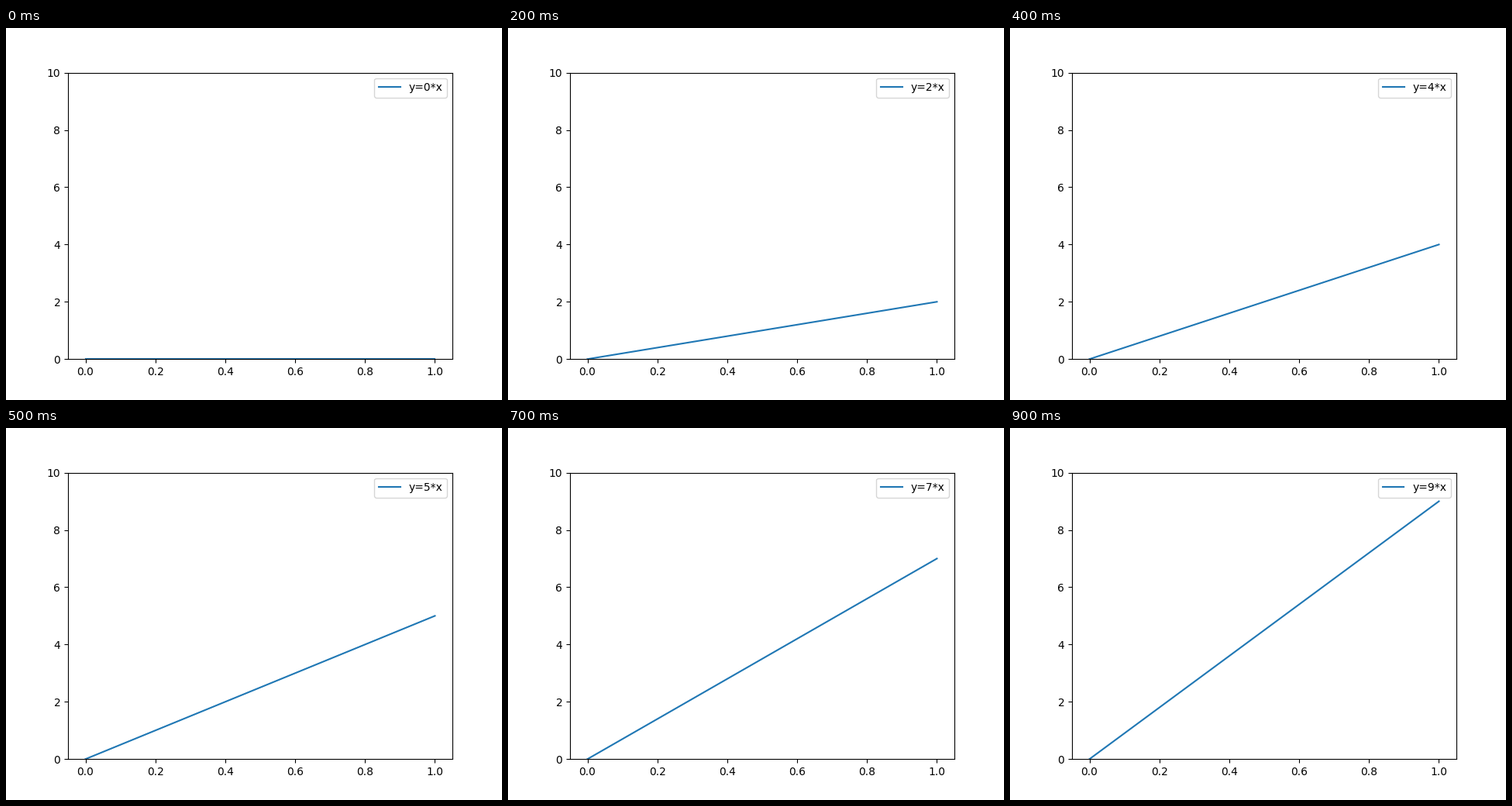
Recreate the animation shown at these times as a matplotlib script. Size 640 by 480 pixels, loop 1000 ms.

```python
import matplotlib.pyplot as plt
import numpy as np
from matplotlib.animation import FuncAnimation

FRAMES = 10
INTERVAL_MS = 100

fig, ax = plt.subplots(figsize=(6.4, 4.8), dpi=100)
x = np.array([0.0, 1.0])
line, = ax.plot(x, 0 * x, label="y=0*x")
ax.set_xlim(-0.05, 1.05)
ax.set_ylim(0, 10)
label = ax.legend(loc="upper right").get_texts()[0]


def update(slope):
    line.set_ydata(slope * x)
    label.set_text(f"y={slope}*x")
    return line, label


anim = FuncAnimation(fig, update, frames=FRAMES, init_func=lambda: update(0),
                     interval=INTERVAL_MS, repeat=True, repeat_delay=0)
plt.show()
```
